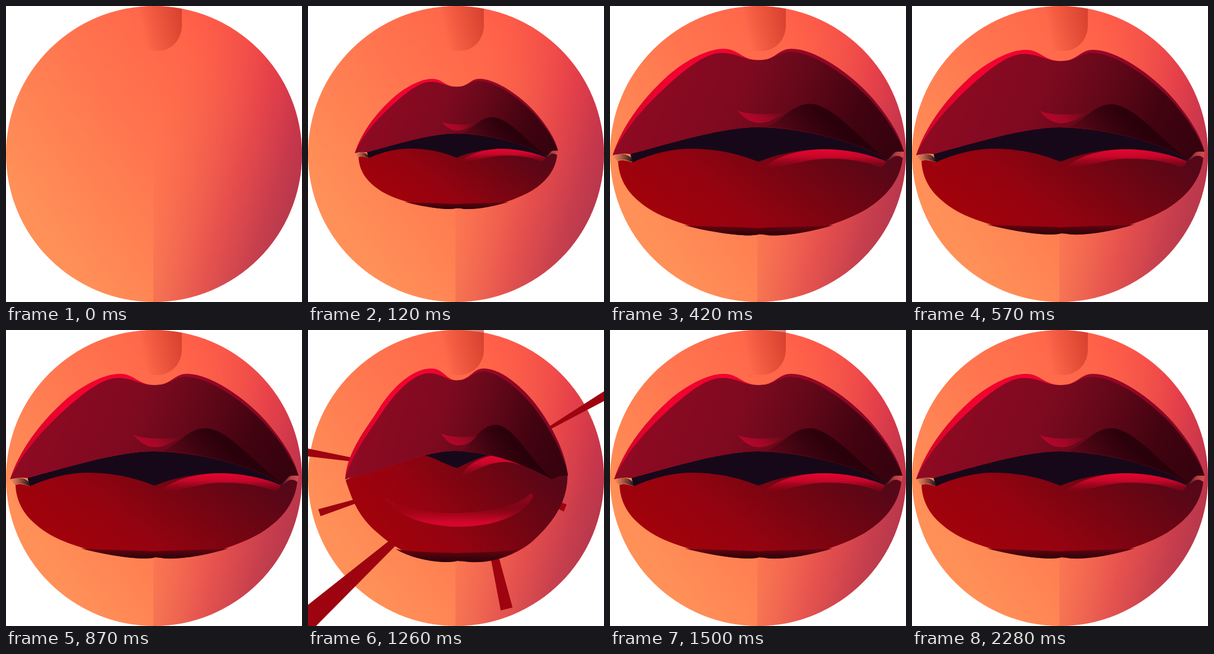
An HTML page for the animation above (2700 ms loop, 500 by 500 pixels).

```html
<!DOCTYPE html>
<html lang="en">
<head>
<meta charset="utf-8">
<title>Kiss</title>
<style>
html, body { margin: 0; width: 100%; height: 100%; overflow: hidden; background: #fff; }
svg { display: block; width: 100%; height: 100%; }
</style>
</head>
<body>
<svg viewBox="0 0 500 500">
  <defs>
    <clipPath id="disc"><circle cx="250" cy="250" r="250"/></clipPath>
    <linearGradient id="skin" gradientUnits="userSpaceOnUse" x1="80" y1="400" x2="470" y2="130">
      <stop stop-color="#ff9058"/><stop offset=".45" stop-color="#ff754f"/>
      <stop offset=".8" stop-color="#ff6449"/><stop offset="1" stop-color="#ff5347"/>
    </linearGradient>
    <linearGradient id="shade" gradientUnits="userSpaceOnUse" x1="262" y1="180" x2="510" y2="262">
      <stop stop-color="#f06450" stop-opacity="0"/><stop offset=".587" stop-color="#c8284c" stop-opacity=".45"/>
      <stop offset=".85" stop-color="#a01e4e" stop-opacity=".58"/><stop offset="1" stop-color="#91204e" stop-opacity=".65"/>
    </linearGradient>
    <linearGradient id="noseFill" gradientUnits="userSpaceOnUse" x1="230" y1="35" x2="300" y2="20">
      <stop stop-color="#be2d1e" stop-opacity="0"/><stop offset=".12" stop-color="#be2d1e" stop-opacity=".1"/>
      <stop offset="1" stop-color="#be2d1e" stop-opacity=".62"/>
    </linearGradient>
    <linearGradient id="rim">
      <stop stop-color="#d00428"/><stop offset=".2" stop-color="#f2032f"/><stop offset=".42" stop-color="#f0032f"/>
      <stop offset=".56" stop-color="#a00626"/><stop offset="1" stop-color="#7c0622"/>
    </linearGradient>
    <linearGradient id="upperFill" x1="0" y1=".55" x2="1" y2=".7">
      <stop stop-color="#900a23"/><stop offset=".4" stop-color="#7e0a20"/>
      <stop offset=".6" stop-color="#640819"/><stop offset=".82" stop-color="#420310"/><stop offset="1" stop-color="#35020e"/>
    </linearGradient>
    <linearGradient id="foldFill" x1=".05" y1=".7" x2=".6" y2=".4">
      <stop stop-color="#24000a" stop-opacity="0"/><stop offset="1" stop-color="#24000a" stop-opacity=".85"/>
    </linearGradient>
    <linearGradient id="dimpleFill" x1="0" y1=".6" x2="1" y2=".3">
      <stop stop-color="#bd062b"/><stop offset=".5" stop-color="#a00727"/><stop offset="1" stop-color="#700819"/>
    </linearGradient>
    <linearGradient id="lowerFill" x1=".08" y1=".7" x2="1" y2=".35">
      <stop stop-color="#a3020a"/><stop offset=".35" stop-color="#940310"/>
      <stop offset=".7" stop-color="#720512"/><stop offset="1" stop-color="#560718"/>
    </linearGradient>
    <linearGradient id="underFill" x2="0" y2="1">
      <stop stop-color="#6a0410"/><stop offset="1" stop-color="#290208"/>
    </linearGradient>
    <linearGradient id="glossFill" x2="0" y2="1">
      <stop stop-color="#e4062f"/><stop offset=".4" stop-color="#c8062a"/><stop offset="1" stop-color="#800514" stop-opacity=".4"/>
    </linearGradient>
    <linearGradient id="shineFill" x2="0" y2="1">
      <stop stop-color="#c0062a" stop-opacity=".5"/><stop offset=".45" stop-color="#a8051e" stop-opacity=".25"/>
      <stop offset=".85" stop-color="#d2062c"/><stop offset="1" stop-color="#d8062d"/>
    </linearGradient>
    <linearGradient id="leftCorner">
      <stop stop-color="#f58a5c"/><stop offset=".3" stop-color="#c0694c"/><stop offset="1" stop-color="#180b18"/>
    </linearGradient>
    <linearGradient id="rightCorner">
      <stop stop-color="#180818"/><stop offset=".6" stop-color="#b03f45"/><stop offset="1" stop-color="#d84c4d"/>
    </linearGradient>
  </defs>

  <circle cx="250" cy="250" r="250" fill="url(#skin)"/>
  <path clip-path="url(#disc)" d="M249 0H500V500H249Z" fill="url(#shade)"/>
  <g id="nose"><path d="M215 0H297V33C297 57 279 76 256 76C246 76 237 75 230 68Z" fill="url(#noseFill)"/></g>

  <g id="rays" fill="#9d040f">
    <path d="M-30 194V210L90 224V219Z"/>
    <path d="M16 303L20 315L100 286L98 281Z"/>
    <path d="M160 338L-40 496L-14 528L170 342Z"/>
    <path d="M304 360L326 475L346 470L316 360Z"/>
    <path d="M390 277L438 295L433 307L388 284Z"/>
    <path d="M392 173L540 78V99L394 176Z"/>
  </g>

  <g id="lips">
    <path fill="#170819"
      data-rest="M36 248L40 265L252 270L464 264L468 256C425 228 330 200 250 200C190 200 110 225 36 248Z"
      data-pout="M180 216L200 222L252 240L300 222L330 214C320 208 290 202 250 200C225 202 200 208 180 216Z"/>
    <path fill="url(#leftCorner)"
      data-rest="M8 253C20 247 38 249 42 264C32 262 25 256 16 262C13 260 10 256 8 253Z"
      data-pout="M63 252C64 250 68 250 70 256C69 258 68 260 67 262C65 260 64 255 63 252Z"/>
    <path fill="url(#rightCorner)"
      data-rest="M462 263C470 248 480 243 494 246L493 256C485 250 478 254 474 258Q470 262 462 263Z"
      data-pout="M412 251C418 248 424 245 439 246L438 250C434 248 428 248 424 250Q418 252 412 251Z"/>
    <path fill="url(#lowerFill)"
      data-rest="M16 262C25 258 32 262 40 264C75 248 110 241 140 241C190 242 220 251 251 263C285 248 330 241 370 242C410 243 440 252 464 262C474 260 474 253 483 253C487 253 490 255 492 257C488 290 470 318 430 343C390 366 320 388 270 386Q258 384 252 384Q245 386 230 386C180 384 110 366 75 346C40 325 18 300 16 262Z"
      data-pout="M64 254C75 246 90 243 100 240C125 230 150 214 185 210C212 212 225 225 252 233C270 224 290 213 318 208C350 210 385 232 412 248C418 248 420 246 428 246C432 246 436 246 438 246C438 285 420 320 380 356C350 382 310 394 275 392Q258 390 252 390Q245 392 230 392C185 390 145 368 117 342C85 315 74 285 64 254Z"/>
    <path fill="url(#underFill)"
      data-rest="M126 369C170 372 210 371 250 374C290 371 330 372 376 369C340 380 300 387 270 386Q258 384 252 384Q245 386 230 386C200 385 160 378 126 369Z"
      data-pout="M148 370C180 376 215 375 250 377C290 375 325 376 356 370C335 386 305 393 275 392Q258 390 252 390Q245 392 230 392C200 391 170 383 148 370Z"/>
    <path fill="url(#glossFill)"
      data-rest="M262 271C285 250 330 241 365 242C405 243 440 252 464 262Q462 270 455 273C430 262 400 257 360 258C330 259 300 270 275 272Q265 274 262 271Z"
      data-pout="M258 246C270 225 295 212 322 211C335 214 350 221 358 227Q357 227 355 227C345 222 330 222 318 224C300 227 285 235 272 242Q262 248 258 246Z"/>
    <path id="shine" fill="url(#shineFill)"
      data-rest="M120 290C165 318 330 320 386 286Q393 286 389 293C340 335 180 338 122 298Z"
      data-pout="M131 282C165 318 330 320 375 277Q383 277 379 285C340 347 180 348 133 289Z"/>
    <path fill="url(#rim)"
      data-rest="M7 252C22 205 55 160 95 123C125 95 165 74 192 74C218 74 222 93 252 93C280 93 283 74 306 74C345 74 405 115 440 155C470 190 488 220 494 246L483 246C475 246 472 258 464 260C425 232 330 206 250 205C190 205 110 230 36 250C25 248 15 250 7 252Z"
      data-pout="M63 252C66 205 100 165 118 136C140 100 175 65 208 65C230 65 232 85 252 85C274 85 278 65 297 65C330 65 372 105 395 140C425 185 436 220 439 246L430 246C420 246 418 251 412 252C370 232 330 209 250 204C215 204 170 218 110 240C90 245 75 248 63 252Z"/>
    <path fill="url(#upperFill)"
      data-rest="M7 252C28 205 65 165 110 125C140 100 165 81 190 81C220 82 225 94 252 93C280 93 281 80 304 79C345 80 400 120 437 158C466 190 486 222 494 246L483 246C475 246 472 258 464 260C425 232 330 206 250 205C190 205 110 230 36 250C25 248 15 250 7 252Z"
      data-pout="M63 252C74 210 105 170 126 138C150 102 180 73 205 73C230 74 232 86 252 85C274 85 276 71 297 70C326 72 366 108 390 142C420 185 434 220 439 246L430 246C420 246 418 251 412 252C370 232 330 209 250 204C215 204 170 218 110 240C90 245 75 248 63 252Z"/>
    <path fill="url(#dimpleFill)"
      data-rest="M215 177C235 185 265 184 294 181C280 190 268 198 252 198C237 198 226 189 215 177Z"
      data-pout="M224 174C240 182 265 182 292 178C280 186 268 195 254 195C241 195 233 186 224 174Z"/>
    <path fill="url(#foldFill)"
      data-rest="M262 205C290 196 305 166 338 166C375 168 415 220 466 259C425 232 330 206 262 205Z"
      data-pout="M258 204C280 192 290 160 318 160C350 164 375 220 412 251C370 232 330 209 258 204Z"/>
  </g>
</svg>
<script>
const LOOP = 2700, STEP = 30;
const byId = id => document.getElementById(id);
const clamp = x => Math.min(1, Math.max(0, x));
const span = (t, from, to) => clamp((t - from) / (to - from));
const easeInOut = u => u < .5 ? 4 * u ** 3 : 1 - 4 * (1 - u) ** 3;
const backOut = (u, c = .9) => 1 - (c + 1) * (1 - u) ** 3 + c * (1 - u) ** 2;
const scaleAt = (x, y, s) => `translate(${x} ${y}) scale(${s}) translate(${-x} ${-y})`;

const number = /-?\d+(?:\.\d+)?/g;
const shapes = [...document.querySelectorAll('[data-rest]')].map(path => ({
  path,
  rest: path.dataset.rest,
  pout: path.dataset.pout.match(number).map(Number)
}));

function morph({ path, rest, pout }, amount) {
  let i = 0;
  path.setAttribute('d', rest.replace(number, n => (+n + (pout[i++] - n) * amount).toFixed(2)));
}

function draw(t) {
  const pout = easeInOut(span(t, 870, 1080)) - easeInOut(span(t, 1230, 1500));
  shapes.forEach(shape => morph(shape, pout));
  byId('shine').setAttribute('opacity', pout);
  byId('lips').setAttribute('transform', scaleAt(251, 240, backOut(span(t, 0, 480))));
  byId('rays').setAttribute('transform', scaleAt(251, 240, pout));
  byId('rays').setAttribute('visibility', pout > 0 ? 'visible' : 'hidden');
  // The nose spills over the disc from the pout until the late reset.
  const spills = t > 870 && t < 2280;
  byId('nose').setAttribute('clip-path', spills ? 'none' : 'url(#disc)');
}

const start = performance.now();
function tick() {
  const t = (performance.now() - start) % LOOP;
  draw(Math.floor(t / STEP) * STEP);
  requestAnimationFrame(tick);
}
tick();
</script>
</body>
</html>
```
